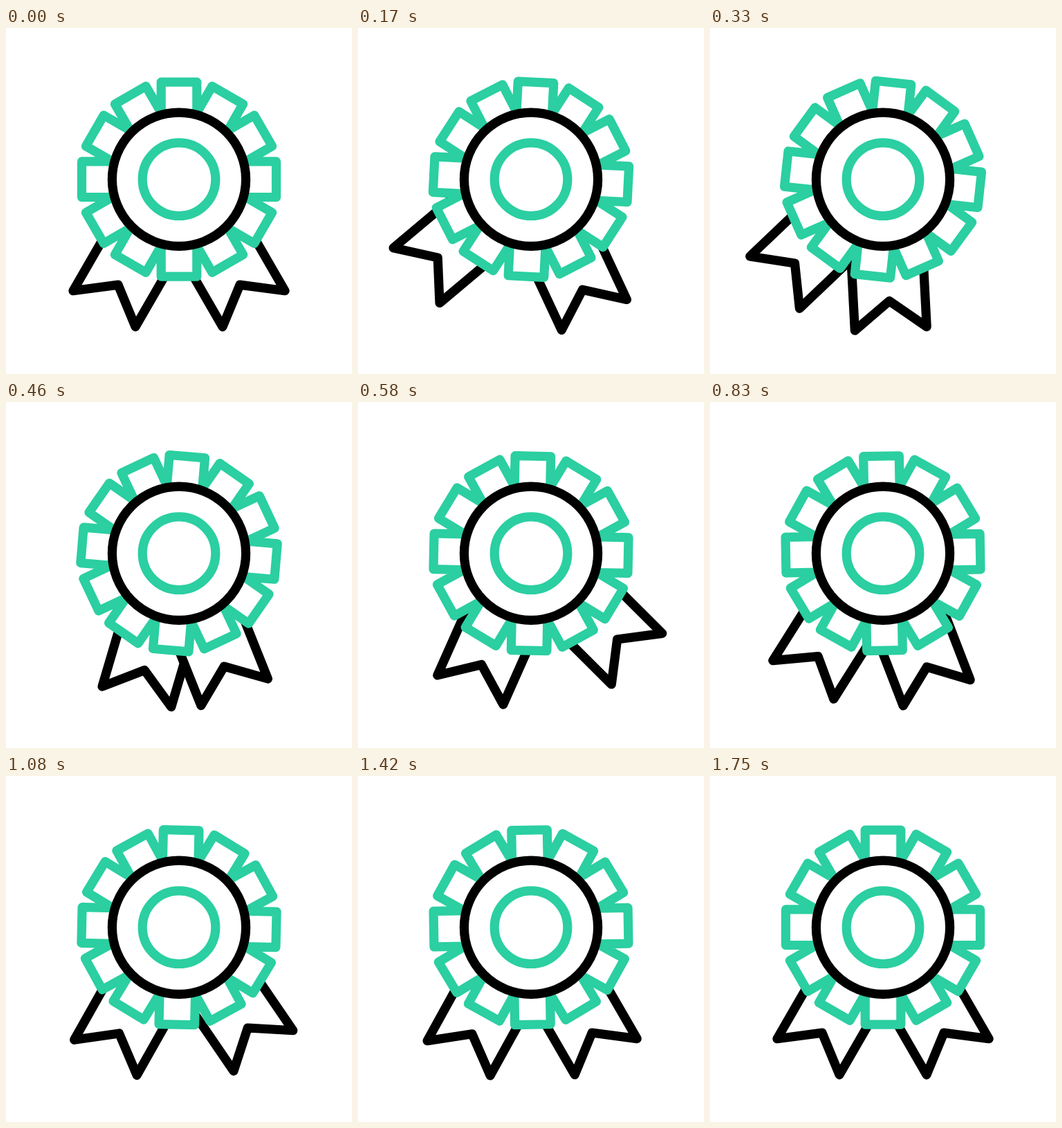
These frames come from a looping animation (500 by 500 pixels, 1.79 s). An HTML page:

```html
<!DOCTYPE html>
<html lang="en">
<head>
<meta charset="utf-8">
<title>Rosette</title>
<style>
  html, body { margin: 0; width: 100%; height: 100%; overflow: hidden; background: #fff; }
  svg { display: block; width: 100%; height: 100%; }
  svg * { fill: #fff; stroke: #000; stroke-width: 13.2; stroke-linejoin: round; stroke-linecap: round; }
  svg .green { stroke: #2bcfa1; }
</style>
</head>
<body>
<svg viewBox="0 0 500 500">
  <g transform="translate(250 218.7)">
    <path id="left" d="M-52 0V216L0 176L52 216V0"/>
    <path id="right" d="M-52 0V216L0 176L52 216V0"/>
    <path id="petals" class="green"/>
    <circle r="96.6"/>
    <circle r="52.8" class="green"/>
  </g>
</svg>
<script>
const LOOP = 1790, FPS = 24;
const part = id => document.getElementById(id);

// Each row is [time in ms, angle in degrees]; turns ease to rest at every row.
const swing = (delay, end) => [
  [delay, 0],
  ...[27.3, -15.1, 9.2, -4.8, 2, -1.1].map((angle, i) => [delay + 255 + i * 231.5, angle]),
  [end, 0]
];
const parts = [
  { el: part('left'), rest: 30, keys: swing(0, 1700) },
  { el: part('right'), rest: -30, keys: swing(95, 1745) },
  { el: part('petals'), rest: 0, keys: [[0, 0], [350, 6.2], [740, -1.5], [1080, 1.3], [1420, -1], [1630, 0]] }
];

function petalPath(count, halfWidth, inner, outer) {
  let d = '';
  for (let i = 0; i < count; i++) {
    const a = i * 2 * Math.PI / count, c = Math.cos(a), s = Math.sin(a);
    const at = (x, y) => `${(x * c - y * s).toFixed(2)} ${(x * s + y * c).toFixed(2)}`;
    d += `M${at(-halfWidth, -inner)}L${at(-halfWidth, -outer)}L${at(halfWidth, -outer)}L${at(halfWidth, -inner)}`;
  }
  return d;
}

function angleAt(keys, t) {
  if (t <= keys[0][0]) return keys[0][1];
  const i = keys.findIndex(key => key[0] > t);
  if (i < 0) return keys[keys.length - 1][1];
  const [t0, a0] = keys[i - 1], [t1, a1] = keys[i];
  const eased = (1 - Math.cos(Math.PI * (t - t0) / (t1 - t0))) / 2;
  return a0 + (a1 - a0) * eased;
}

function draw(now) {
  // The motion is stepped; the offset absorbs rounding of step times to 10 ms.
  const t = Math.floor((now % LOOP + 5) * FPS / 1000) * 1000 / FPS;
  for (const { el, rest, keys } of parts) {
    el.setAttribute('transform', `rotate(${(rest + angleAt(keys, t)).toFixed(3)})`);
  }
}

part('petals').setAttribute('d', petalPath(12, 25.8, 97, 140.5));

const start = performance.now();
function tick() {
  draw(performance.now() - start);
  requestAnimationFrame(tick);
}
tick();
</script>
</body>
</html>
```
